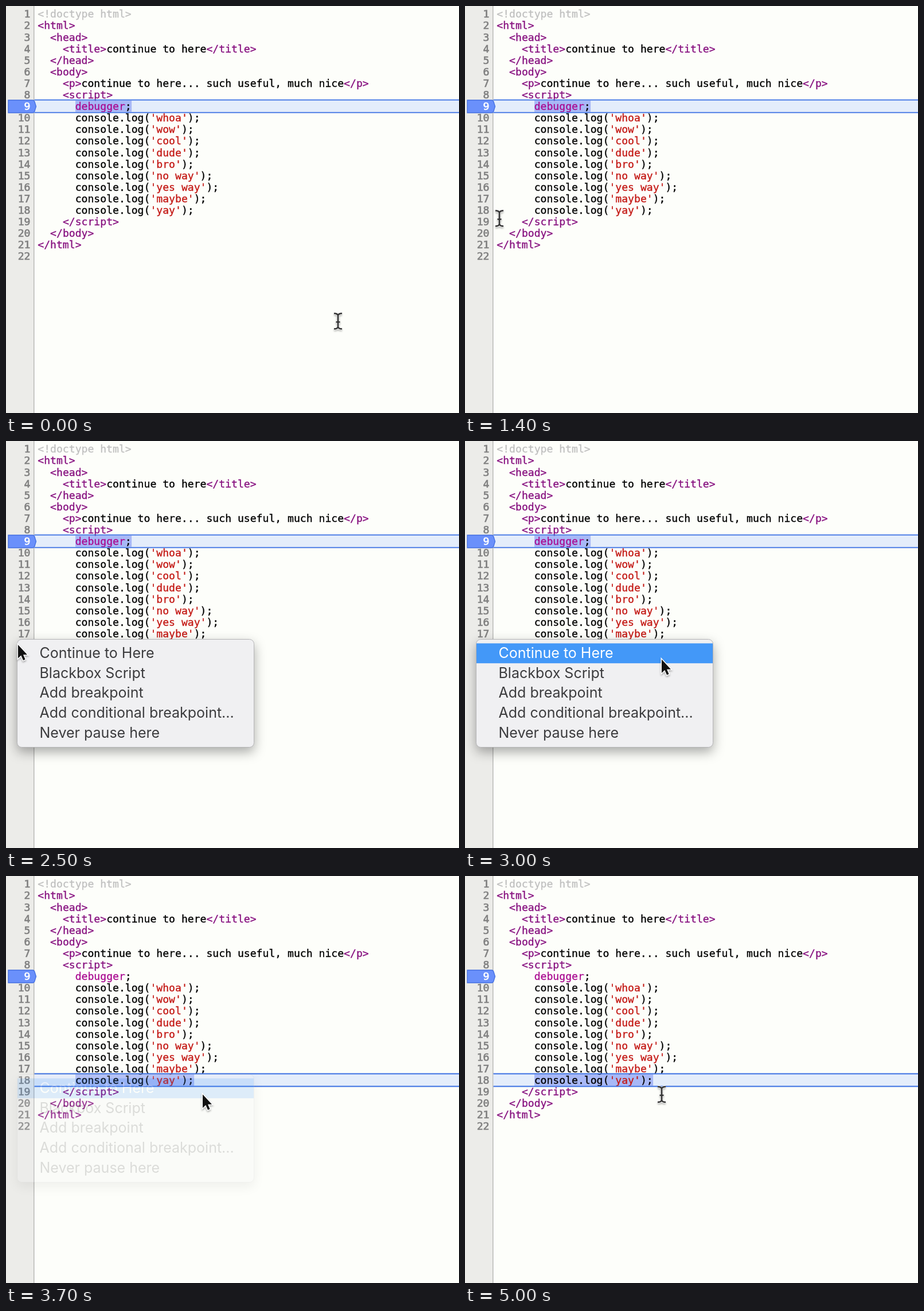
Animation of 790 by 709 pixels, one loop 5.1 s. Source, as an HTML page:

```html
<!DOCTYPE html>
<html lang="en">
<head>
<meta charset="utf-8">
<title>Continue to here</title>
<style>
  html, body { margin: 0; width: 100%; height: 100%; overflow: hidden; background: #fdfefa; }
  svg { display: block; }
  text { white-space: pre; }
  #code, #numbers { font: 18.1px "DejaVu Sans Mono", monospace; }
  #code, #code tspan, #numbers text { fill: currentColor; stroke: currentColor; }
  #code { color: #000; stroke-width: .35; }
  #numbers { color: #808080; stroke-width: .7; text-anchor: end; }
  .doctype { color: #c0c0c0; }
  .tag { color: #881280; }
  .string { color: #c41a16; }
  .keyword { color: #aa0d91; }
  .breakpoint { color: #fff; }
  #menu { filter: drop-shadow(0 8px 10px rgba(0, 0, 0, .33)); }
  #items { font: 25px Inter, sans-serif; font-optical-sizing: none; fill: #3c3c3e; }
  #items .active { fill: #fff; }
  #arrow, #beam { filter: drop-shadow(0 2px 1.5px rgba(0, 0, 0, .3)); }
</style>
</head>
<body>
<svg width="790" height="709" viewBox="0 0 790 709">
  <defs>
    <path id="beamShape" fill="none" d="M-7 -13.5Q-1 -13.5 0 -10Q1 -13.5 7 -13.5M0 -10V10M-7 13.5Q-1 13.5 0 10Q1 13.5 7 13.5M-3.5 1.5H3.5"/>
  </defs>
  <rect width="790" height="709" fill="#fdfefa"/>
  <rect width="48" height="709" fill="#ecece9"/>
  <rect x="48" width="1.5" height="709" fill="#b8b8b6"/>
  <g id="pausedBack">
    <rect x="49.5" y="-11" width="741" height="22" fill="#e4edfb"/>
    <rect id="selection" x="121" y="-10" height="20" fill="#a8b8f6"/>
  </g>
  <path d="M4 164H46.5Q49 164 50 167L52.5 175L50 183Q49 186 46.5 186H4Z" fill="#6a90fb" stroke="#4470e2" stroke-width="1.3"/>
  <g id="numbers"></g>
  <g id="code"></g>
  <path id="pausedEdges" d="M49.5 -11H790M49.5 11H790" stroke="#3b70e3" stroke-width="1.8"/>
  <g id="menu">
    <rect x="19.5" y="345.5" width="413" height="188" rx="8" fill="#f0f0f2" stroke="#b4b4b6"/>
    <rect id="highlight" x="20" y="352.5" width="412" height="34.7" fill="#4398f8"/>
    <g id="items"></g>
  </g>
  <path id="arrow" d="M0 0V23.5L5.3 18.6L9 27L12.6 25.5L9 17.2H16Z" fill="#111" stroke="#fff" stroke-width="3" paint-order="stroke"/>
  <g id="beam">
    <use href="#beamShape" stroke="#fff" stroke-opacity=".75" stroke-width="4.6"/>
    <use href="#beamShape" stroke="#363636" stroke-width="2.7"/>
  </g>
</svg>
<script>
const $ = id => document.getElementById(id);
const LOOP = 5100, STEP = 100, LINE = 20.1, CHAR = 10.9;

const logs = ['whoa', 'wow', 'cool', 'dude', 'bro', 'no way', 'yes way', 'maybe', 'yay'];
const lines = [
  '<!doctype html>',
  '<html>',
  '  <head>',
  '    <title>continue to here</title>',
  '  </head>',
  '  <body>',
  '    <p>continue to here... such useful, much nice</p>',
  '    <script>',
  '      debugger;',
  ...logs.map(word => `      console.log('${word}');`),
  '    <\/script>',
  '  </body>',
  '</html>',
  ''
];
const DEBUGGER_LINE = 8, LAST_LOG_LINE = 17;
const menuItems = ['Continue to Here', 'Blackbox Script', 'Add breakpoint',
  'Add conditional breakpoint...', 'Never pause here'];

function addText(parent, x, y, content, className = '') {
  const node = document.createElementNS('http://www.w3.org/2000/svg', 'text');
  node.setAttribute('x', x);
  node.setAttribute('y', y);
  node.setAttribute('class', className);
  node.innerHTML = content;
  parent.append(node);
  return node;
}

function colorize(line) {
  return line.replace(/<[^>]*>|'[^']*'|debugger/g, token => {
    const kind = token.startsWith('<!') ? 'doctype' : token[0] === '<' ? 'tag'
      : token[0] === "'" ? 'string' : 'keyword';
    return `<tspan class="${kind}">${token.replace('<', '&lt;').replace('>', '&gt;')}</tspan>`;
  });
}

lines.forEach((line, i) => {
  const y = 20.3 + i * LINE;
  const indent = line.search(/\S|$/);
  addText($('numbers'), 42.5, y, i + 1, i === DEBUGGER_LINE ? 'breakpoint' : '');
  addText($('code'), 55.3 + indent * CHAR, y, colorize(line.trim()));
});
const itemNodes = menuItems.map((label, i) => addText($('items'), 58.5, 378 + i * 34.7, label));

// Each key: time, then values, joined by straight segments.
const pointerKeys = [
  [0, 579, 549], [500, 579, 549], [600, 571, 547], [700, 508, 526], [800, 410, 493],
  [900, 315, 461], [1200, 150, 403], [1400, 60, 370], [1600, 23, 357], [1700, 21, 355],
  [2500, 21, 355], [2600, 60, 359], [2800, 255, 374], [3000, 343, 380.5], [5100, 343, 380.5]
];
const fadeKeys = [[0, 1], [3400, 1], [3500, .83], [3600, .5], [3700, .17], [3800, 0], [5100, 0]];

function sample(keys, t) {
  const i = keys.findIndex(key => key[0] > t);
  const a = keys[i - 1], b = keys[i], k = (t - a[0]) / (b[0] - a[0]);
  return a.slice(1).map((v, j) => v + (b[j + 1] - v) * k);
}

const moveTo = (id, x, y) => $(id).setAttribute('transform', `translate(${x} ${y})`);
const show = (id, on) => $(id).setAttribute('visibility', on ? 'visible' : 'hidden');

function render(now) {
  const t = Math.floor(now % LOOP / STEP) * STEP;
  const [x, y] = sample(pointerKeys, t);
  const menuOpen = t >= 2300 && t < 3800;
  const active = t >= 2600;
  const paused = t < 3700 ? DEBUGGER_LINE : LAST_LOG_LINE;

  const pausedY = 13.8 + paused * LINE;
  moveTo('pausedBack', 0, pausedY);
  moveTo('pausedEdges', 0, pausedY);
  $('selection').setAttribute('width', lines[paused].trim().length * CHAR);

  $('menu').style.opacity = sample(fadeKeys, t)[0];
  $('menu').style.display = menuOpen ? '' : 'none';
  $('highlight').style.display = active ? '' : 'none';
  itemNodes[0].setAttribute('class', active ? 'active' : '');

  const arrow = menuOpen || x < 49;
  show('arrow', arrow);
  show('beam', !arrow);
  moveTo('arrow', x, y);
  moveTo('beam', x, y);
}

const start = performance.now();
function animate() {
  render(performance.now() - start);
  requestAnimationFrame(animate);
}
animate();
</script>
</body>
</html>
```
